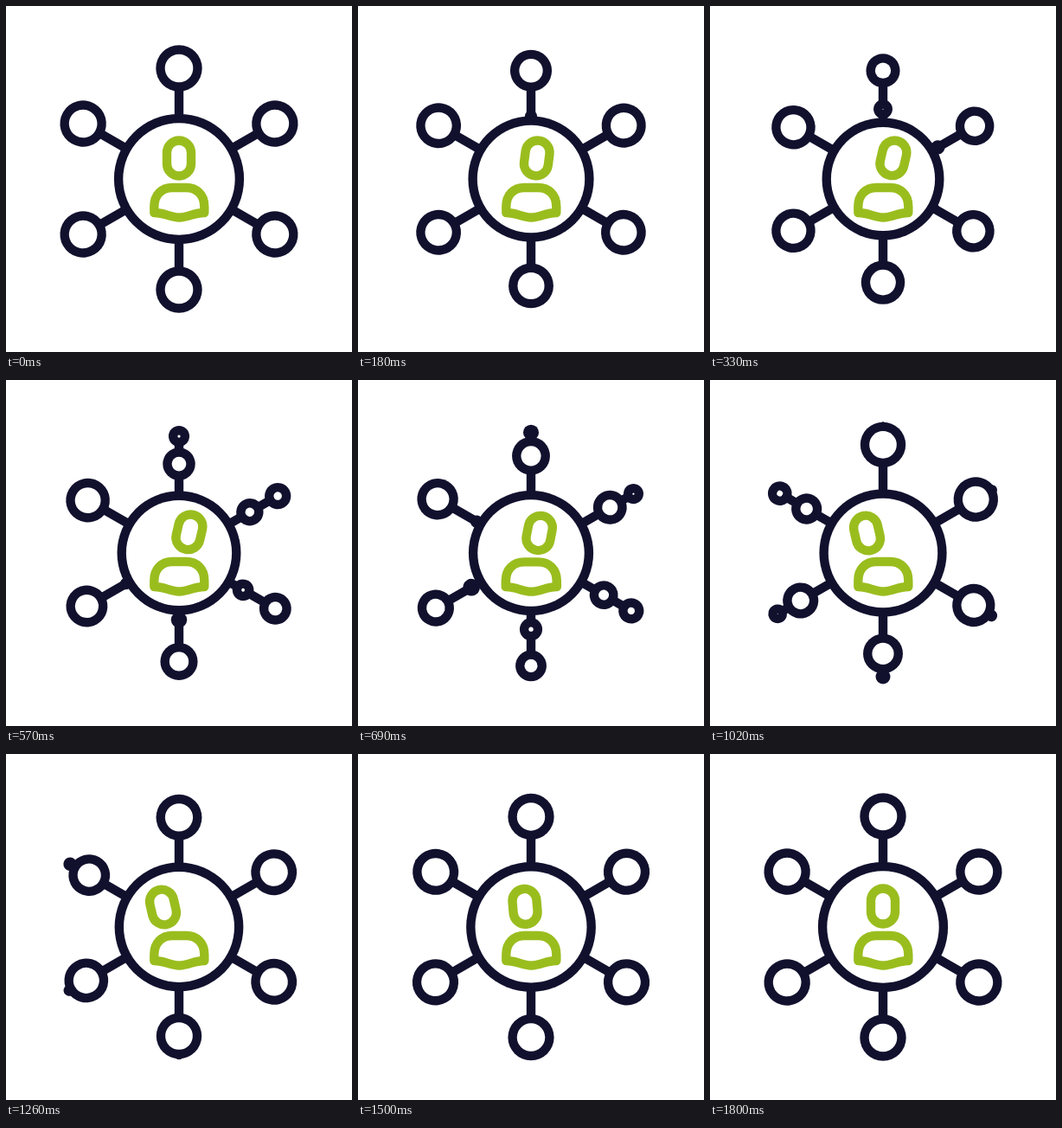
An HTML page for the animation above (3830 ms loop, 400 by 400 pixels).

```html
<!DOCTYPE html>
<html lang="en">
<head>
<meta charset="utf-8">
<title>Network hub</title>
<style>
html, body { margin: 0; width: 100%; height: 100%; overflow: hidden; background: #fff; }
svg { display: block; width: 100%; height: 100%; }
.ink { fill: #11112e; }
.hole { fill: #fff; }
line { stroke: #11112e; stroke-width: 10.4; stroke-linecap: round; }
.user { fill: none; stroke: #9abd1e; stroke-width: 10.4; stroke-linejoin: round; }
</style>
</head>
<body>
<svg viewBox="0 0 400 400">
  <g id="net" transform="translate(200 200)"></g>
  <g class="user">
    <rect id="head" x="-14" y="-20.5" width="28" height="41" rx="14"/>
    <path id="body" d="M-29 11V4C-29-10-20-18-8-18H8C20-18 29-10 29 4V11C16 11 11 16.5 0 16.5S-16 11-29 11Z"/>
  </g>
</svg>
<script>
const LOOP = 3830, STEP = 30, ACTIVE = 1800;
const HUB = 69.9, REACH = 128, NODE = 21.5, HALF = 5.2;
const STAGGER = 100, TRAVEL = 1060;
const $ = id => document.getElementById(id);
const clamp = x => Math.min(1, Math.max(0, x));

// Cubic Bezier easing, solved by bisection.
function bezier(x1, y1, x2, y2) {
  const at = (a, b, u) => 3 * (1 - u) ** 2 * u * a + 3 * (1 - u) * u * u * b + u ** 3;
  return x => {
    if (x <= 0) return 0;
    if (x >= 1) return 1;
    let lo = 0, hi = 1;
    for (let i = 0; i < 24; i++) {
      const mid = (lo + hi) / 2;
      if (at(x1, x2, mid) < x) lo = mid; else hi = mid;
    }
    return at(y1, y2, lo);
  };
}

const smooth = bezier(0.33, 0, 0.67, 1);
const glide = bezier(0.33, 0, 0.5, 1);
const settle = bezier(0.2, 0.2, 0.5, 1);

// Eased value of a list of [time, value] keys.
function track(t, keys) {
  let [t0, v0] = keys[0];
  for (const [t1, v1] of keys) {
    if (t < t1) return v0 + (v1 - v0) * smooth(clamp((t - t0) / (t1 - t0)));
    t0 = t1;
    v0 = v1;
  }
  return v0;
}

function add(tag, parent, attrs = {}) {
  const el = document.createElementNS('http://www.w3.org/2000/svg', tag);
  set(el, attrs);
  parent.append(el);
  return el;
}

function set(el, attrs) {
  for (const name in attrs) el.setAttribute(name, attrs[name]);
}

// A ring of constant weight that closes to a solid dot when small.
function ring(parent) {
  const g = add('g', parent);
  const ink = add('circle', g, { class: 'ink' });
  const hole = add('circle', g, { class: 'hole' });
  return (dist, r, shown = true) => {
    set(g, { visibility: shown ? 'visible' : 'hidden' });
    set(ink, { cy: -dist, r: r + HALF });
    set(hole, { cy: -dist, r: Math.max(0, r - HALF) });
  };
}

const spokes = Array.from({ length: 6 }, (_, i) => {
  const g = add('g', $('net'), { transform: `rotate(${i * 60})` });
  return { line: add('line', g), old: ring(g), fresh: ring(g) };
});
const hub = ring($('net'));

// The outer node shrinks away while a new one grows out of the hub.
function drawSpoke({ line, old, fresh }, p, scale) {
  const far = (REACH + NODE * p) * scale;
  const near = (HUB + (REACH - HUB) * p) * scale;
  set(line, { y1: -HUB * scale, y2: -(p < 1 ? far : near) });
  old(far, NODE * (1 - p) * scale, p < 1);
  fresh(near, NODE * p * scale, p > 0);
}

const sway = [[0, 0], [330, 1], [630, 1], [990, -1], [1290, -1], [1650, 0]];
const dip = [[630, 0], [810, 1], [990, 0]];
const lean = [[0, 0], [330, 1], [1290, 1], [1650, 0]];

function draw(t) {
  const scale = t < 340 ? 1 - 0.066 * smooth(t / 340)
                        : 0.934 + 0.066 * settle((t - 340) / 1460);
  hub(0, HUB * scale);
  spokes.forEach((s, i) => drawSpoke(s, glide((t - i * STAGGER) / TRAVEL), scale));

  const side = track(t, sway), drop = track(t, dip), off = track(t, lean);
  const x = 200 + 15.2 * side - 3.3 * off;
  const y = 176 + 0.4 * off - 0.6 * side + 4 * drop;
  set($('head'), {
    transform: `translate(${x} ${y}) rotate(${13 * side}) scale(1 ${1 - 0.05 * drop})`
  });
  set($('body'), {
    transform: `translate(200.3 ${228 + drop}) scale(${1 + 0.06 * drop} ${1 - 0.03 * drop})`
  });
}

const start = performance.now();
function tick() {
  const t = (performance.now() - start) % LOOP;
  draw(Math.min(ACTIVE, Math.floor(t / STEP) * STEP));
  requestAnimationFrame(tick);
}
tick();
</script>
</body>
</html>
```
